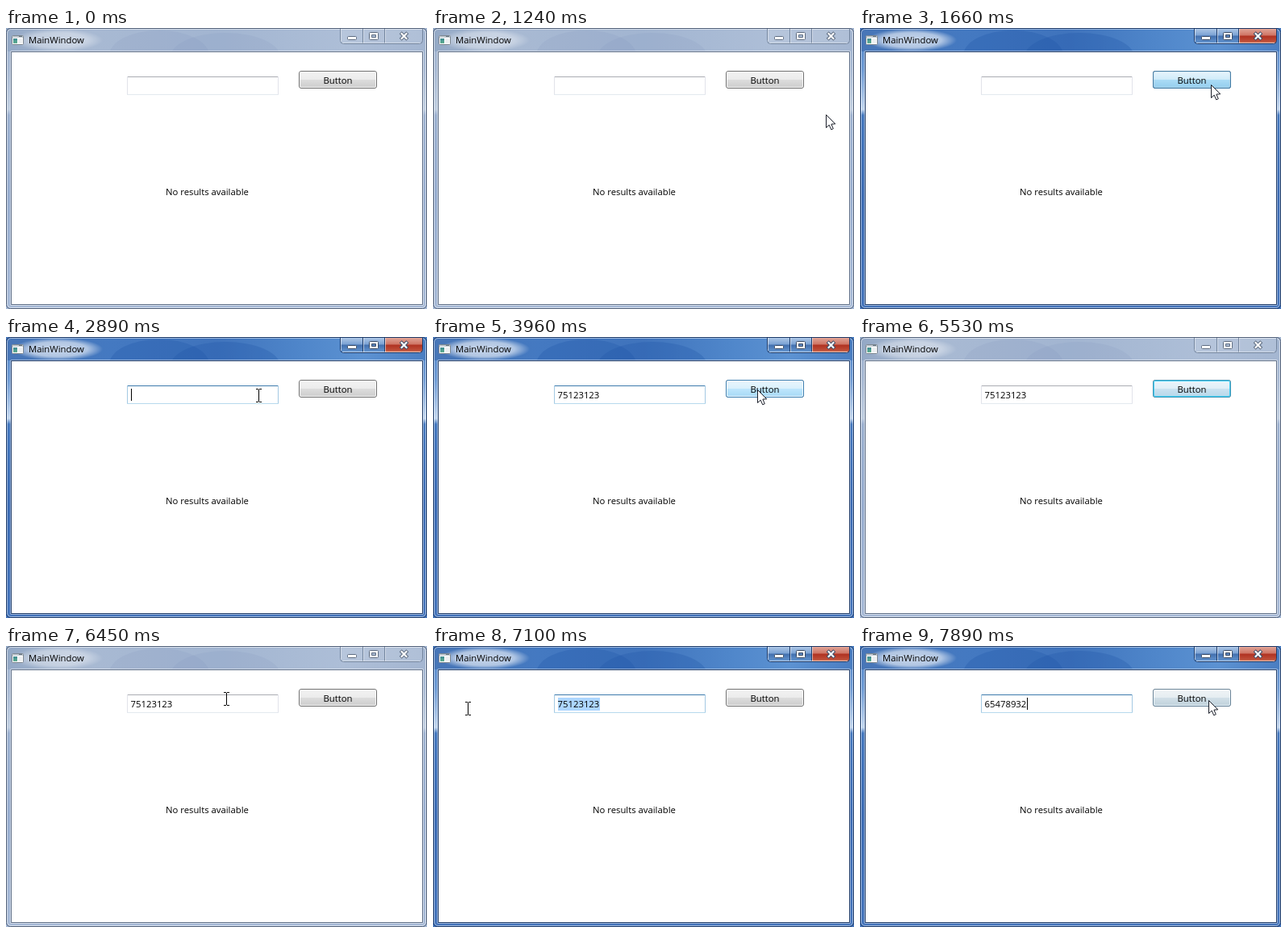
An HTML page with a canvas for the animation above (7.99 s loop, 522 by 348 pixels).

```html
<!DOCTYPE html>
<html lang="en">
<head>
<meta charset="utf-8">
<title>MainWindow</title>
<style>
  html, body { margin: 0; width: 100%; height: 100%; overflow: hidden; background: #fff; }
  canvas { display: block; width: 522px; height: 348px; }
</style>
</head>
<body>
<canvas id="stage" width="522" height="348"></canvas>
<script>
const W = 522, H = 348, LOOP = 7990;
const ctx = document.getElementById('stage').getContext('2d', { alpha: false });
const FONT = '11.3px "Open Sans", "Noto Sans", sans-serif';

// Bursts of activity: start, end, number of steps. The picture rests in between.
const BURSTS = [
  [1120, 1850, 13], [1930, 2420, 9], [2560, 3340, 14], [3400, 3460, 2],
  [3640, 3960, 6], [4150, 4210, 2], [4360, 4830, 8], [5280, 5280, 1],
  [5530, 5530, 1], [5750, 5830, 2], [6030, 6450, 8], [6590, 7170, 9], [7350, 7890, 10]
];

const POINTER = [
  [1120, 505, 120], [1600, 435, 70], [1930, 435, 70], [2420, 313, 72],
  [3160, 313, 72], [3340, 359, 68], [3460, 371, 68], [3580, 371, 68],
  [3960, 402, 65], [4300, 402, 65], [4770, 454, 95], [6030, 476, 21],
  [6450, 273, 65], [6590, 273, 65], [7100, 42, 77], [7350, 42, 77],
  [7710, 340, 80], [7830, 432, 67]
];
const HOVER = [
  [1480, 0], [1600, 1], [2050, 1], [2350, 0], [3580, 0], [3820, 1],
  [4500, 1], [4760, 0], [7770, 0], [7890, 0.35]
];
const PRESS = [[1600, 0], [1670, 0.5], [1740, 0.7], [1800, 0], [4090, 0], [4210, 1], [4360, 1], [4490, 0]];
const FOCUS = [
  [1740, 0], [1850, 1], [2560, 1], [2740, 0], [4300, 0], [4500, 1],
  [5270, 1], [5280, 0.8], [5690, 0.8], [5830, 0]
];

const within = (t, a, b) => t >= a && t < b;

function snap(t) {
  let held = 0;
  for (const [a, b, n] of BURSTS) {
    if (t < a) break;
    const step = n > 1 ? (b - a) / (n - 1) : 1;
    held = Math.min(b, a + Math.floor((t - a + 10) / step) * step);
  }
  return held;
}

// Linear value of channel c on a track of [time, ...values].
function track(keys, t, c = 1) {
  if (t <= keys[0][0]) return keys[0][c];
  for (let i = 1; i < keys.length; i++) {
    const p = keys[i - 1], q = keys[i];
    if (t <= q[0]) return p[c] + (q[c] - p[c]) * (t - p[0]) / (q[0] - p[0]);
  }
  return keys[keys.length - 1][c];
}

function ramp(x0, y0, x1, y1, stops) {
  const g = ctx.createLinearGradient(x0, y0, x1, y1);
  for (const [at, color] of stops) g.addColorStop(at, color);
  return g;
}

function rect(x, y, w, h, color) {
  ctx.fillStyle = color;
  ctx.fillRect(x, y, w, h);
}

function roundBox(x, y, w, h, r, fill, stroke) {
  ctx.beginPath();
  ctx.roundRect(x + 0.5, y + 0.5, w - 1, h - 1, r);
  if (fill) { ctx.fillStyle = fill; ctx.fill(); }
  if (stroke) { ctx.strokeStyle = stroke; ctx.lineWidth = 1; ctx.stroke(); }
}

function label(s, x, y, align = 'left') {
  ctx.font = FONT;
  ctx.textAlign = align;
  ctx.fillStyle = '#000';
  ctx.fillText(s, x, y);
}

function ellipse(x, y, rx, ry, color) {
  ctx.beginPath();
  ctx.ellipse(x, y, rx, ry, 0, 0, Math.PI * 2);
  ctx.fillStyle = color;
  ctx.fill();
}

function drawGlass(active) {
  rect(0, 0, W, H, active ? '#3f71b8' : '#a3b6d1');
  const side = active
    ? [[0, '#4f82c6'], [0.15, '#6d9ad4'], [0.29, '#c3d7ef'], [0.31, '#4377be'], [0.6, '#3a6ab3'], [1, '#4474bb']]
    : [[0, '#9db1ce'], [0.15, '#a7b9d3'], [0.29, '#c0cee0'], [0.31, '#9bb0cf'], [0.6, '#96acce'], [1, '#a6b9d6']];
  rect(0, 0, W, H, ramp(0, 0, 0, H, side));

  ctx.save();
  ctx.beginPath();
  ctx.rect(0, 0, W, 29);
  ctx.clip();
  rect(0, 0, W, 29, active
    ? ramp(0, 0, W, 0, [[0, '#4876b7'], [0.25, '#4479c1'], [0.5, '#3f73bc'], [0.7, '#4f86ca'], [0.85, '#5c92d2'], [1, '#4a7dc1']])
    : ramp(0, 0, W, 0, [[0, '#93a8c5'], [0.15, '#a9bad3'], [0.5, '#a2b5d1'], [0.8, '#adbed7'], [1, '#a4b6d1']]));
  const arch = active ? 'rgba(30,82,165,.28)' : 'rgba(120,145,185,.14)';
  ellipse(190, 34, 62, 31, arch);
  ellipse(272, 36, 68, 30, arch);
  ctx.translate(64, 15);
  ctx.scale(1, 0.25);
  const glow = ctx.createRadialGradient(0, 0, 8, 0, 0, 56);
  const strength = active ? 0.68 : 0.42;
  glow.addColorStop(0, `rgba(255,255,255,${strength})`);
  glow.addColorStop(0.6, `rgba(255,255,255,${strength * 0.85})`);
  glow.addColorStop(1, 'rgba(255,255,255,0)');
  rect(-64, -60, 130, 120, glow);
  ctx.restore();

  roundBox(1, 1, W - 2, H - 2, 5, null, active ? 'rgba(255,255,255,.5)' : 'rgba(255,255,255,.55)');
  roundBox(0, 0, W, H, 5, null, active ? '#223f6c' : '#53627a');
  roundBox(5, 28, 513, 316, 1, null, active ? 'rgba(255,255,255,.45)' : 'rgba(255,255,255,.5)');
  roundBox(6, 29, 511, 314, 0, '#fff', active ? '#25406b' : '#617189');
}

function drawIcon() {
  roundBox(7, 9, 15, 12, 1, '#fdfdfd', '#7d8790');
  rect(8, 10, 13, 2, '#c4ccd3');
  rect(9, 13, 5, 6, ramp(0, 13, 0, 19, [[0, '#3f8b93'], [1, '#5fae8f']]));
  rect(16, 10, 4, 1, '#667481');
  rect(15, 13, 5, 6, '#eceff1');
}

function drawCaption(active) {
  const edge = active ? '#1f3d6c' : '#74869f';
  const shine = active ? 'rgba(255,255,255,.55)' : 'rgba(255,255,255,.4)';
  const blue = ramp(0, 0, 0, 20, [[0, '#b3cbe8'], [0.45, '#7ba2d4'], [0.5, '#426fae'], [1, '#6a9cd6']]);
  const red = ramp(0, 0, 0, 20, [[0, '#e3aa9d'], [0.45, '#cf7565'], [0.5, '#b03222'], [0.8, '#bd4b36'], [1, '#dc8a68']]);
  const pale = 'rgba(255,255,255,.12)';

  ctx.save();
  ctx.beginPath();
  ctx.rect(410, 1, 110, 20);
  ctx.clip();
  ctx.beginPath();
  ctx.roundRect(414.5, -4.5, 102, 24, 4);
  ctx.save();
  ctx.clip();
  rect(414, 0, 56, 20, active ? blue : pale);
  rect(470, 0, 47, 20, active ? red : pale);
  ctx.restore();
  ctx.strokeStyle = edge;
  ctx.lineWidth = 1;
  ctx.stroke();
  for (const x of [442, 469]) {
    rect(x, 1, 1, 18, edge);
    rect(x + 1, 1, 1, 18, shine);
  }
  rect(415, 1, 1, 16, shine);
  rect(417, 18, 97, 1, shine);
  ctx.restore();

  const ink = active ? '#3b4c66' : '#5f6d82';
  roundBox(423, 10, 12, 5, 1, '#fff', ink);
  roundBox(450, 5, 12, 10, 1, '#fff', ink);
  roundBox(453, 8, 6, 4, 0, active ? '#5a85bf' : '#a9bbd4', ink);
  ctx.lineCap = 'butt';
  for (const [color, width, d] of [[ink, 4.2, 4.3], ['#fff', 2.2, 3.7]]) {
    ctx.strokeStyle = color;
    ctx.lineWidth = width;
    ctx.beginPath();
    ctx.moveTo(493.5 - d, 10 - d);
    ctx.lineTo(493.5 + d, 10 + d);
    ctx.moveTo(493.5 + d, 10 - d);
    ctx.lineTo(493.5 - d, 10 + d);
    ctx.stroke();
  }
}

function buttonFace(alpha, colors, border, inner) {
  if (alpha <= 0) return;
  const [a, b, c, d] = colors;
  ctx.globalAlpha = alpha;
  roundBox(363, 53, 97, 22, 2.5, ramp(0, 54, 0, 74, [[0, a], [0.5, b], [0.5, c], [1, d]]), border);
  roundBox(364, 54, 95, 20, 1.5, null, inner);
  ctx.globalAlpha = 1;
}

function drawButton(t) {
  const soft = 'rgba(255,255,255,.8)';
  buttonFace(1, ['#f3f3f3', '#ebebeb', '#dddddd', '#cdcdcd'], '#707070', soft);
  buttonFace(track(FOCUS, t), ['#eaf6fd', '#dceffa', '#c6e4f6', '#b0daf1'], '#2f93b8', '#1cc6f2');
  buttonFace(track(HOVER, t), ['#eaf6fd', '#d9f0fc', '#bee6fd', '#a7d9f5'], '#3c7fb1', soft);
  buttonFace(track(PRESS, t), ['#e5f4fc', '#c4e5f6', '#98d1ef', '#7fc2e5'], '#2c628b', 'rgba(120,160,185,.45)');
  label('Button', 411.5, 69, 'center');
}

function drawField(t, pointer, active) {
  const focused = within(t, 2560, 4150) || t >= 6590;
  const hovered = active && pointer.beam;
  const [top, side, base] = focused ? ['#3d7bad', '#a4c9e3', '#b7d9ed']
    : hovered ? ['#5794bf', '#b7d5ea', '#c7e2f1']
    : ['#abadb3', '#e2e3ea', '#e3e9ef'];
  rect(150, 60, 188, 23, side);
  rect(150, 82, 188, 1, base);
  rect(151, 60, 186, 1, top);
  rect(151, 61, 186, 21, '#fff');

  let value = '';
  if (t >= 7350) value = '65478932'.slice(0, 1 + Math.floor((t - 7350) / 50));
  else if (t >= 2920) value = '75123123'.slice(0, 1 + Math.floor((t - 2920) / 45));

  ctx.font = FONT;
  const end = 155 + Math.round(ctx.measureText(value).width);
  if (within(t, 6590, 7350)) {
    const from = Math.max(155, Math.min(end, pointer.x));
    rect(from, 64, end - from, 16, '#add6ff');
  }
  label(value, 154.6, 76);
  const selecting = within(t, 6700, 7350);
  if (within(t, 2560, 3700) || (t >= 6590 && !selecting)) rect(end, 64, 1, 15, '#000');
}

function pointerAt(t) {
  const x = Math.round(track(POINTER, t, 1)), y = Math.round(track(POINTER, t, 2));
  const shown = within(t, 1120, 2920) || within(t, 3270, 4800) || within(t, 6030, 7350) || t >= 7700;
  const over = x >= 150 && x < 338 && y >= 60 && y < 83;
  return { x, y, shown, beam: shown && (over || within(t, 6590, 7110)) };
}

function drawPointer({ x, y, shown, beam }) {
  if (!shown) return;
  if (beam) {
    rect(x, y - 7, 1, 15, '#000');
    for (const dy of [-8, 8]) {
      rect(x - 3, y + dy, 3, 1, '#000');
      rect(x + 1, y + dy, 3, 1, '#000');
    }
    return;
  }
  ctx.beginPath();
  ctx.moveTo(x + 0.5, y + 0.5);
  for (const [dx, dy] of [[0, 16], [3.7, 12.6], [6.2, 18.3], [8.8, 17.2], [6.4, 11.6], [11.3, 11.3]]) {
    ctx.lineTo(x + 0.5 + dx, y + 0.5 + dy);
  }
  ctx.closePath();
  ctx.fillStyle = '#fff';
  ctx.fill();
  ctx.strokeStyle = '#1b1f2a';
  ctx.lineWidth = 1;
  ctx.stroke();
}

function draw(now) {
  const t = snap(now % LOOP);
  const active = within(t, 1600, 5530) || t >= 6590;
  const pointer = pointerAt(t);
  drawGlass(active);
  drawIcon();
  label('MainWindow', 28, 19);
  drawCaption(active);
  drawField(t, pointer, active);
  drawButton(t);
  label('No results available', 198, 207);
  drawPointer(pointer);
}

function loop() {
  draw(performance.now());
  requestAnimationFrame(loop);
}
loop();
</script>
</body>
</html>
```
